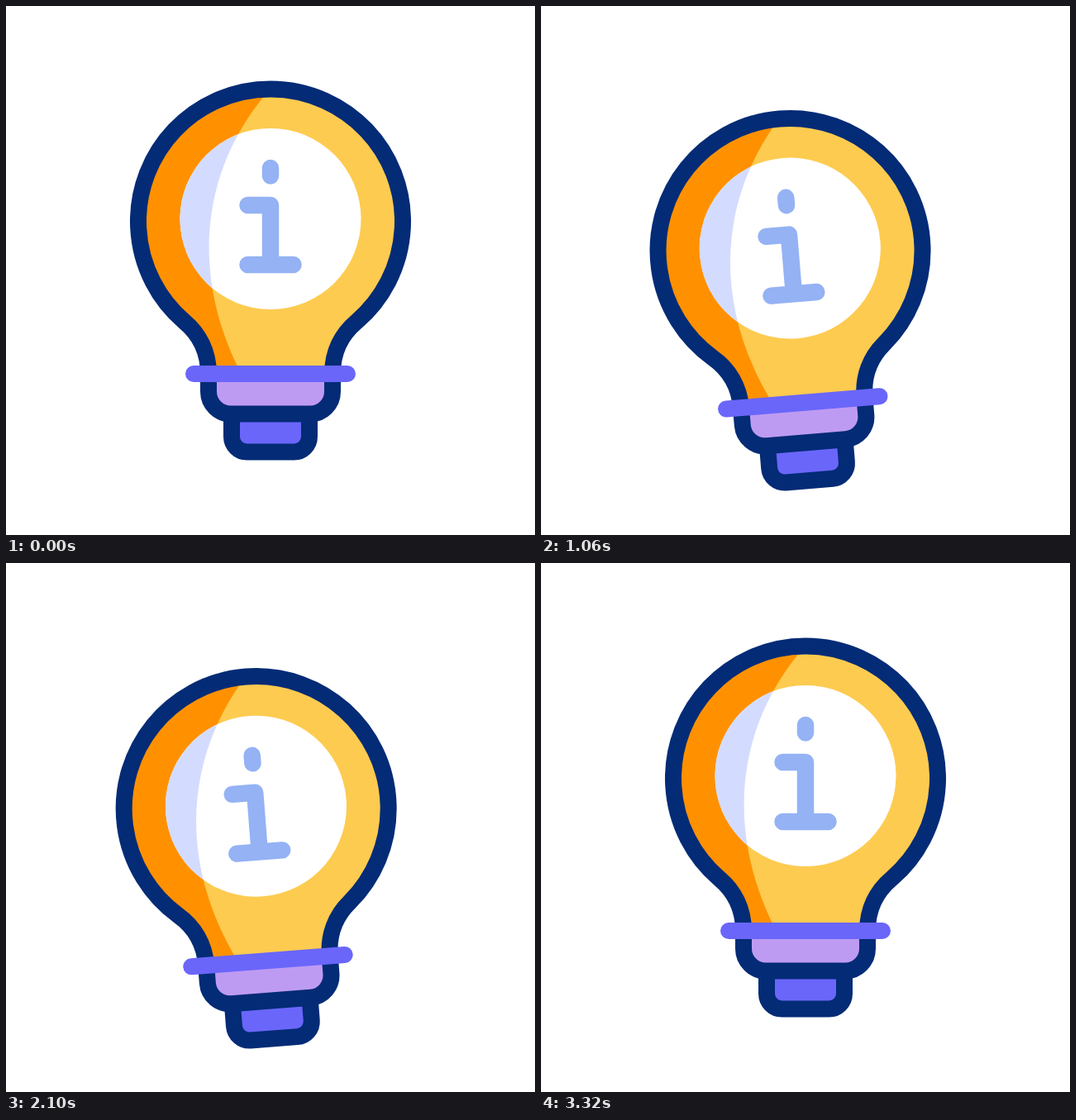
Write an HTML page that moves like this. It is 640 px wide and 640 px high and loops after 3.56 s.

```html
<!DOCTYPE html>
<html lang="en">
<head>
<meta charset="utf-8">
<title>Info bulb</title>
<style>
  html, body { margin: 0; width: 100%; height: 100%; overflow: hidden; background: #fff; }
  svg { display: block; width: 100vw; height: 100vh; }
</style>
</head>
<body>
<svg viewBox="0 0 640 640">
  <defs>
    <path id="glass" d="M245 445C245 419 234 397 216 382A160 160 0 1 1 424 382C406 397 395 419 395 445"/>
    <clipPath id="inGlass"><use href="#glass"/></clipPath>
    <clipPath id="inDisc"><circle cx="320" cy="257.500" r="109.500"/></clipPath>
    <path id="shade" d="M318 102C229 206 227 334 285 446H130V102Z"/>
  </defs>
  <g id="marks" fill="none" stroke="#fdcb50" stroke-width="21" stroke-linecap="round">
    <path d="M36 301A180.600 180.600 0 0 1 53 224.500"/>
    <path d="M36 301A180.600 180.600 0 0 0 53 377.500"/>
    <path d="M567 287.300A180.600 180.600 0 0 0 553 211"/>
    <path d="M567 287.300A180.600 180.600 0 0 1 547.500 364.500"/>
  </g>
  <g id="bulb">
    <use href="#glass" fill="#fdcb50"/>
    <use href="#shade" fill="#ff9100" clip-path="url(#inGlass)"/>
    <circle cx="320" cy="257.500" r="109.500" fill="#fff"/>
    <use href="#shade" fill="#d3dcfe" clip-path="url(#inDisc)"/>
    <g fill="none" stroke="#94b2f4" stroke-width="20.500" stroke-linecap="round" stroke-linejoin="round">
      <path d="M320 196v9.500M292.500 241H320V313M292.500 313H347.500"/>
    </g>
    <g stroke="#042b76" stroke-width="20">
      <path d="M273 493V521A18.500 18.500 0 0 0 291.500 539.500H348.500A18.500 18.500 0 0 0 367 521V493" fill="#6a66fa"/>
      <path d="M245 445V466.500A27 27 0 0 0 272 493.500H368A27 27 0 0 0 395 466.500V445" fill="#be9bf2"/>
      <use href="#glass" fill="none"/>
    </g>
    <path d="M227 445H413" stroke="#6a66fa" stroke-width="20" stroke-linecap="round"/>
  </g>
</svg>
<script>
  const LOOP = 3560;
  // Keys are [time, value] pairs, eased in and out between neighbours.
  const LIFT = [[240, 0], [460, -52], [1110, 36], [2700, 36], [3310, 0]];
  const TILT = [[605, 0], [1140, -5], [1660, 5], [2180, -5], [2700, 5], [3310, 0]];
  const GROW = [[1140, 0], [1275, 1]];
  const ERASE = [[1275, 0], [1412, 1]];

  const bulb = document.getElementById('bulb');
  const marks = document.getElementById('marks');
  const arcs = [...marks.children].map(el => ({ el, len: el.getTotalLength() }));

  function valueAt(keys, t) {
    if (t <= keys[0][0]) return keys[0][1];
    for (let i = 1; i < keys.length; i++) {
      const [t0, a] = keys[i - 1], [t1, b] = keys[i];
      if (t < t1) return a + (b - a) * (1 - Math.cos(Math.PI * (t - t0) / (t1 - t0))) / 2;
    }
    return keys[keys.length - 1][1];
  }

  function draw(t) {
    bulb.setAttribute('transform',
      `translate(0 ${valueAt(LIFT, t)}) rotate(${valueAt(TILT, t)} 320 484)`);

    const from = valueAt(ERASE, t), to = valueAt(GROW, t);
    marks.style.display = to > from ? '' : 'none';
    for (const { el, len } of arcs) {
      el.setAttribute('stroke-dasharray', `${Math.max(0.01, (to - from) * len)} ${len * 3}`);
      el.setAttribute('stroke-dashoffset', -from * len);
    }
  }

  const start = performance.now();
  function frame() {
    draw((performance.now() - start) % LOOP);
    requestAnimationFrame(frame);
  }
  frame();
</script>
</body>
</html>
```
